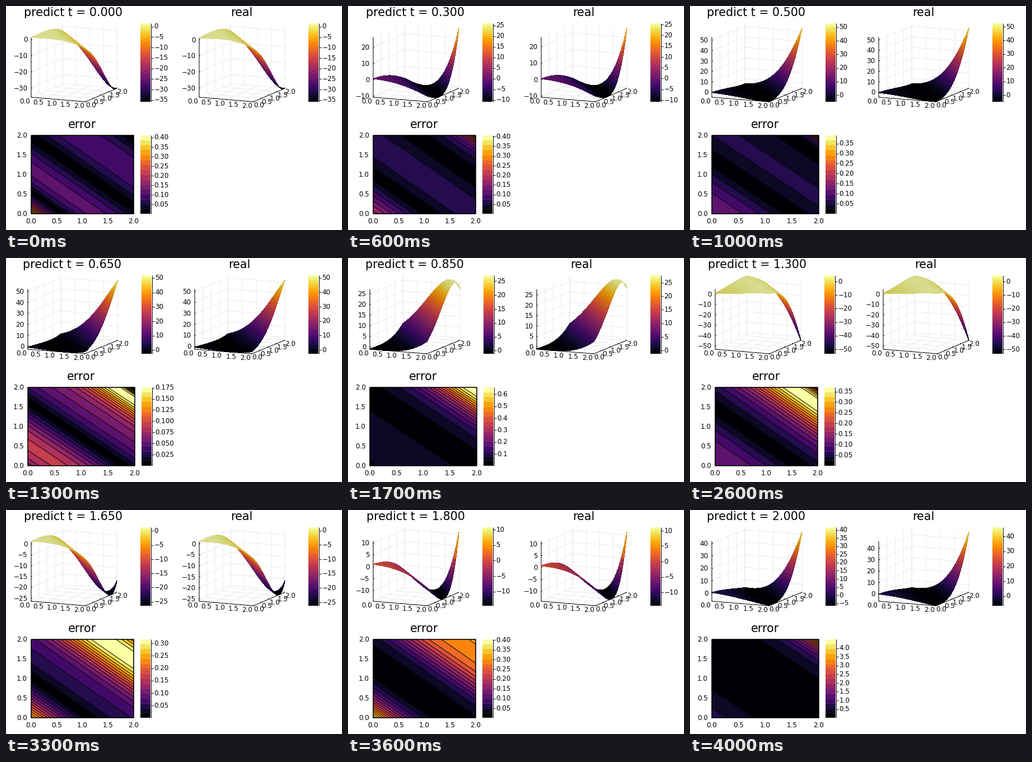
A matplotlib script that plays this animation: 600 by 400 pixels, repeating every 4.1 s.

```python
import numpy as np
import matplotlib
import matplotlib.pyplot as plt
from matplotlib.animation import FuncAnimation
from matplotlib.collections import LineCollection, PolyCollection

FRAMES, INTERVAL = 41, 100
PX = 0.72  # points per pixel at 100 dpi
plt.rcParams["font.family"] = "DejaVu Sans"
CMAP = matplotlib.colormaps["inferno"]
BANDS = 16
SHADE = .86

axis_ticks = np.linspace(0, 2, 5)
grid = np.linspace(0, 2, 21)
X, Y = np.meshgrid(grid, grid)


def exact(t):
    return np.exp(X + Y) * np.cos(X + Y + 4 * t)


def bump(x, center, width):
    return np.exp(-((x - center) / width) ** 2)


def residual(t):
    """Signed error of the prediction, almost a function of x + y alone."""
    q = np.clip(X + Y - .05 * (X - Y), 0, 4)

    # Decay away from the near corner
    near = .38 * np.exp(-5 * t) + .85 * (t / 2) ** 8
    near = near * np.exp(-q / (.5 + .1 * t * t))

    # Damped ripple whose crest swings back and forth
    crest = 1.8 * np.sin(1.7 * t) - .9
    ripple = .1 + .1 * np.exp(-8 * t)
    ripple = ripple * np.exp(-q / 4) * np.cos(np.pi / 2 * (q - crest))

    # Broad hill drifting inwards from the far corner
    hill = .9 - .33 * t + .37 * bump(t, .85, .2)
    hill = hill * bump(q, 5.1 - t, .9)

    # Sharp spike in the far corner
    spike = .86 * bump(t, .45, .37) + .3 * bump(t, 1.3, .15) - 4.4 * (t / 2) ** 30
    spike = spike * np.exp((q - 4) / .3)
    return near + ripple - hill + spike


def ticks_in(lo, hi, step):
    first = np.ceil(lo / step - 1e-6) * step
    return np.arange(first, hi + step * 1e-4, step)


def bar_step(span):
    base = 10 ** np.floor(np.log10(span))
    m = span / base
    return base * (1 if m > 5 else .5 if m > 2.5 else .25)


def z_step(span):
    return 10 if span > 31 else 5


def tick_text(v, step):
    places = len(f"{step:g}".partition(".")[2])
    return f"{v if abs(v) > 1e-9 else 0:.{places}f}".replace("-", "\u2212")


fig = plt.figure(figsize=(6, 4), dpi=100, facecolor="white")
ax = fig.add_axes([0, 0, 1, 1])


def label(x, y, s, ha="center"):
    ax.text(x, y + 4.4, s, ha=ha, va="baseline", fontsize=11.9 * PX, zorder=8)


def title(x, base, s):
    ax.text(x, base, s, ha="center", va="baseline", fontsize=20.7 * PX, zorder=8)


def lines(segs, color="black", width=1.0, z=2):
    ax.add_collection(LineCollection(segs, colors=color, linewidths=width * PX,
                                     zorder=z), autolim=False)


def colorbar(x, top, lo, hi, colors):
    bottom = top + 140
    ax.imshow(colors[::-1, None, :], extent=(x, x + 18, bottom, top),
              aspect="auto", interpolation="nearest", zorder=3)
    step = bar_step(hi - lo)
    edge = x + 18.5
    segs = [[(edge, top), (edge, bottom)]]
    for v in ticks_in(lo, hi, step):
        y = bottom - 140 * (v - lo) / (hi - lo)
        segs.append([(edge, y), (edge + 4, y)])
        label(x + 24.5, y - .8, tick_text(v, step), "left")
    lines(segs, z=4)


def surface(x0, wx, wy, bar_x, z, name):
    lo, hi = z.min(), z.max()
    step = z_step(hi - lo)

    def project(u, v, w):
        return np.stack([x0 + wx * u + wy * v,
                         163 + 8 * u - 24 * v - 107.3 * w], axis=-1)

    def path(*pts):
        return [project(*p) for p in pts]

    mesh, marks = [], []
    for a in axis_ticks / 2:
        mesh.append(path((a, 0, 0), (a, 1, 0), (a, 1, 1)))
        mesh.append(path((1, a, 0), (0, a, 0), (0, a, 1)))
        marks.append(path((a, 0, 0), (a, .02, 0)))
        marks.append(path((1, a, 0), (.98, a, 0)))
        px, py = project(a, 0, 0)
        label(px - 11.5, py + 6.5, f"{2 * a:.1f}")
        px, py = project(1, a, 0)
        label(px + 10, py + 5.5, f"{2 * a:.1f}")
    for v in ticks_in(lo, hi, step):
        w = (v - lo) / (hi - lo)
        mesh.append(path((0, 0, w), (0, 1, w), (1, 1, w)))
        marks.append(path((0, 0, w), (.02, 0, w)))
        label(x0 - 6.5, project(0, 0, w)[1], tick_text(v, step), "right")
    lines(mesh, "#ebebeb", z=1)
    marks.append(path((0, 0, 1), (0, 0, 0), (1, 0, 0), (1, 1, 0)))
    lines(marks)

    # Facets painted from back to front
    u, v, w = X / 2, Y / 2, (z - lo) / (hi - lo)
    p = project(u, v, w)
    quads = np.stack([p[:-1, :-1], p[:-1, 1:], p[1:, 1:], p[1:, :-1]],
                     axis=2).reshape(-1, 4, 2)

    def mean(a):
        return ((a[:-1, :-1] + a[:-1, 1:] + a[1:, 1:] + a[1:, :-1]) / 4).ravel()

    order = np.argsort(mean(.5 * u - .87 * v + .23 * w))
    colors = CMAP(mean(w))[order]
    colors[:, :3] *= SHADE
    ax.add_collection(PolyCollection(quads[order], facecolors=colors,
                                     edgecolors=colors, linewidths=.2,
                                     antialiaseds=False, zorder=3), autolim=False)
    title(x0 + (wx + wy) / 2 - 1, 18, name)
    colorbar(bar_x, 31, lo, hi, CMAP(np.linspace(0, 1, 256)))


def error_map(x0, width, bar_x, err):
    hi = err.max()
    lo = max(err.min(), hi * .002)
    levels = np.linspace(lo, hi, BANDS + 1)
    colors = CMAP(np.linspace(0, 1, BANDS))
    px, py = x0 + width * X / 2, 371 - 70 * Y
    fill = levels.copy()
    fill[0], fill[-1] = -1, hi * 1.01
    ax.contourf(px, py, err, levels=fill, colors=colors, antialiased=False, zorder=2)
    ax.contour(px, py, err, levels=levels[1:-1], colors="black",
               linewidths=PX, zorder=3)
    x1 = x0 + width
    lines([[(x0, 231), (x1, 231), (x1, 371.3), (x0, 371.3), (x0, 231)]],
          width=1.6, z=4)
    for v in axis_ticks:
        label(x0 + width * v / 2, 384, f"{v:.1f}")
        label(x0 - 7.5, 371 - 70 * v, f"{v:.1f}", "right")
    title(x0 + width / 2 - .5, 218, "error")
    colorbar(bar_x, 231, lo, hi, colors)
    ax.hlines(371 - 140 * np.arange(1, BANDS - 3) / BANDS, bar_x, bar_x + 18,
              colors="white", alpha=.45, linewidths=.5,
              linestyles=[(0, (1, 2))], zorder=4)


def draw(i):
    t = .05 * i
    ax.clear()
    ax.set_xlim(0, 600)
    ax.set_ylim(400, 0)
    ax.axis("off")
    real, diff = exact(t), residual(t)
    guess = real + diff

    # Negative height labels need a wider left margin
    wide = any(z.min() <= -z_step(np.ptp(z)) for z in (real, guess))
    if wide:
        left, right, wx, wy, width, bar_x = 45, 345, 97, 56, 183, 240
    else:
        left, right, wx, wy, width, bar_x = 39, 337, 102, 59, 191, 242
    surface(left, wx, wy, bar_x, guess, f"predict t = {t:.3f}")
    surface(right, wx, wy, 540, real, "real")
    error_map(left, width, bar_x, np.abs(diff))
    return []


anim = FuncAnimation(fig, draw, frames=FRAMES, interval=INTERVAL,
                     init_func=lambda: [], repeat=True, repeat_delay=0, blit=False)
plt.show()
```
